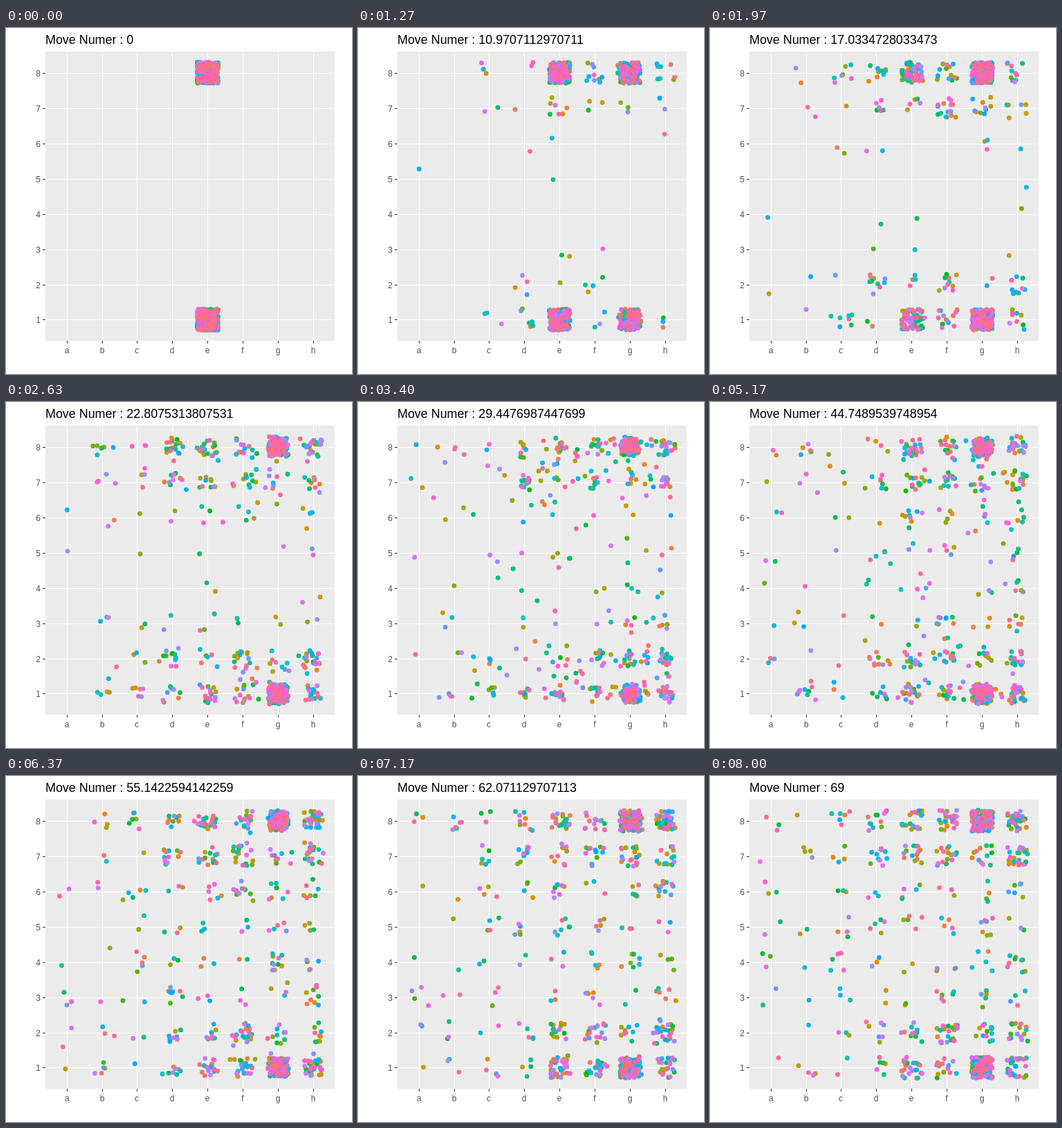
An HTML page with a canvas that plays this animation: 500 px wide and 500 px high, repeating every 10 s.

```html
<!DOCTYPE html>
<html lang="en">
<head>
<meta charset="utf-8">
<title>King positions by move</title>
<style>
  html, body { margin: 0; width: 100%; height: 100%; overflow: hidden; background: #fff; }
  canvas { display: block; }
</style>
</head>
<body>
<canvas id="stage" width="500" height="500"></canvas>
<script>
const ctx = document.getElementById('stage').getContext('2d');
const GAMES = 380, LAST_MOVE = 69, LOOP = 10000;
const PANEL = { x: 57, y: 34, size: 418 };
const CELL = PANEL.size / 8.2;
const px = file => PANEL.x + (file + 0.6) * CELL;
const py = rank => PANEL.y + PANEL.size - (rank + 0.6) * CELL;

let seed = 20;
function random() {
  seed = (seed + 0x6D2B79F5) | 0;
  let t = Math.imul(seed ^ (seed >>> 15), 1 | seed);
  t = (t + Math.imul(t ^ (t >>> 7), 61 | t)) ^ t;
  return ((t ^ (t >>> 14)) >>> 0) / 4294967296;
}

// Evenly spaced hues in CIE LUV, lightness 65, chroma 100
function hueColor(deg) {
  const L = 65, C = 100, a = deg * Math.PI / 180;
  const u = C * Math.cos(a) / (13 * L) + 0.1978;
  const v = C * Math.sin(a) / (13 * L) + 0.4683;
  const Y = ((L + 16) / 116) ** 3;
  const X = 9 * Y * u / (4 * v);
  const Z = Y * (12 - 3 * u - 20 * v) / (4 * v);
  const channel = c => {
    c = Math.min(1, Math.max(0, c));
    return Math.round(255 * (c <= 0.0031308 ? 12.92 * c : 1.055 * c ** (1 / 2.4) - 0.055));
  };
  const rgb = [
    3.2406 * X - 1.5372 * Y - 0.4986 * Z,
    -0.9689 * X + 1.8758 * Y + 0.0415 * Z,
    0.0557 * X - 0.204 * Y + 1.057 * Z
  ];
  return `rgb(${rgb.map(channel)})`;
}

// How much a king likes a square, seen from its own back rank
const BACK = [2, 4, 3, 8, 20, 16, 150, 24];
const SECOND = [2, 3, 3, 10, 10, 15, 12, 18];
const FILES = [2, 2.5, 3, 3.5, 4.5, 4.5, 6, 7];
const RANKS = [0, 0, 1, 0.7, 0.4, 0.25, 0.12, 0.05];
function weight(file, rank) {
  if (file < 0 || file > 7 || rank < 0 || rank > 7) return 0;
  return rank === 0 ? BACK[file] : rank === 1 ? SECOND[file] : FILES[file] * RANKS[rank];
}

const STEPS = [[-1, -1], [0, -1], [1, -1], [-1, 0], [1, 0], [-1, 1], [0, 1], [1, 1]];
const jitter = () => (random() - 0.5) * 0.6;

// One jittered place per move: wait on e, castle or step out, then wander
function kingPath(black) {
  const kind = random(), u = random();
  let start, target = 4;
  if (kind < 0.72) { start = 4 + 14 * u ** 1.1; target = 6; }
  else if (kind < 0.8) { start = 10 + 12 * u; target = 2; }
  else start = 3 + 16 * u;
  start = Math.ceil(start);

  const path = [];
  let file = 4, rank = 0;
  for (let move = 0; move <= LAST_MOVE; move++) {
    if (move === start) file = target;
    else if (move > start && random() < 0.52) {
      const [dx, dy] = STEPS[Math.floor(random() * 8)];
      if (random() < weight(file + dx, rank + dy) / weight(file, rank)) {
        file += dx;
        rank += dy;
      }
    }
    path.push({
      x: px(file + jitter()),
      y: py((black ? 7 - rank : rank) + jitter())
    });
  }
  return path;
}

const games = Array.from({ length: GAMES }, (_, i) => ({
  color: hueColor(15 + 360 * i / (GAMES - 1)),
  kings: [kingPath(false), kingPath(true)]
}));

function drawAxes() {
  ctx.fillStyle = '#fff';
  ctx.fillRect(0, 0, 500, 500);
  ctx.fillStyle = '#ebebeb';
  ctx.fillRect(PANEL.x, PANEL.y, PANEL.size, PANEL.size);
  const bottom = PANEL.y + PANEL.size;
  ctx.font = '12px "Liberation Sans", Arial, sans-serif';
  for (let i = 0; i < 8; i++) {
    const x = Math.round(px(i) - 0.05), y = Math.round(py(i) + 0.08);
    ctx.fillStyle = '#fff';
    ctx.fillRect(x, PANEL.y, 1, PANEL.size);
    ctx.fillRect(PANEL.x, y, PANEL.size, 1);
    ctx.fillStyle = '#333';
    ctx.fillRect(x, bottom, 1, 4);
    ctx.fillRect(PANEL.x - 4, y, 4, 1);
    ctx.fillStyle = '#4d4d4d';
    ctx.textAlign = 'center';
    ctx.fillText('abcdefgh'[i], x, 470);
    ctx.textAlign = 'right';
    ctx.fillText(i + 1, 50, y + 5);
  }
}

function draw(move) {
  drawAxes();
  ctx.fillStyle = '#000';
  ctx.textAlign = 'left';
  ctx.font = '17.9px "Liberation Sans", Arial, sans-serif';
  ctx.fillText('Move Numer : ' + Number(move.toPrecision(15)), 57, 23);

  const from = Math.floor(move), to = Math.min(LAST_MOVE, from + 1), f = move - from;
  for (const { color, kings } of games) {
    ctx.fillStyle = color;
    for (const path of kings) {
      const a = path[from], b = path[to];
      ctx.beginPath();
      ctx.arc(a.x + (b.x - a.x) * f, a.y + (b.y - a.y) * f, 3.4, 0, 2 * Math.PI);
      ctx.fill();
    }
  }
}

const begin = performance.now();
let shown = -1;
function tick() {
  const t = (performance.now() - begin) % LOOP;
  // 30 pictures a second, then a pause on the last move
  const step = Math.min(239, Math.floor((t + 3.4) * 0.03));
  if (step !== shown) draw(LAST_MOVE * step / 239);
  shown = step;
  requestAnimationFrame(tick);
}
tick();
</script>
</body>
</html>
```
